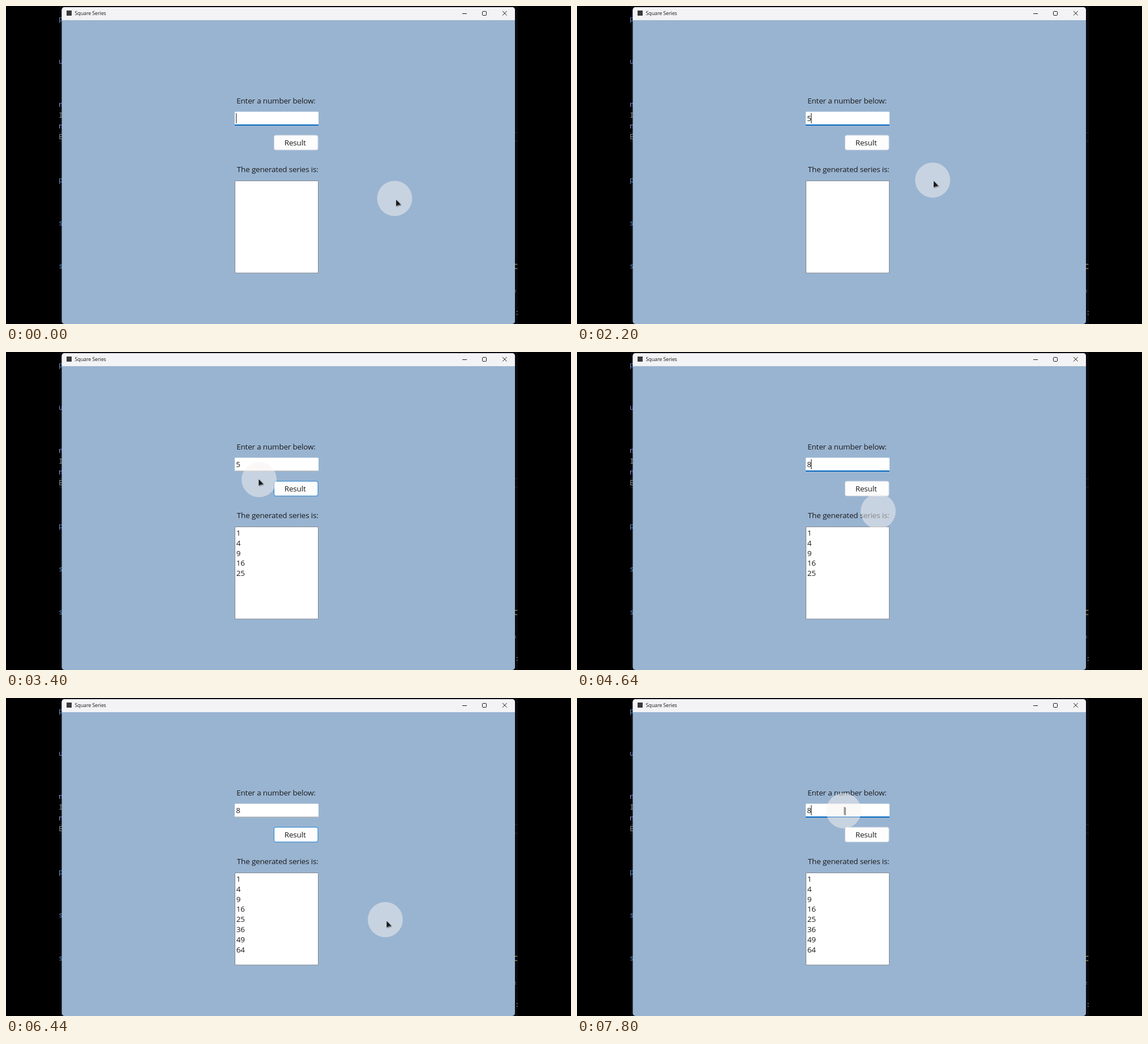
Write an HTML page with a canvas that moves like this. It is 998 by 561 pixels and loops after 8000 ms.

```html
<!DOCTYPE html>
<html lang="en">
<head>
<meta charset="utf-8">
<title>Square Series</title>
<style>
html, body { margin: 0; width: 100%; height: 100%; overflow: hidden; background: #000; }
canvas { display: block; width: 998px; height: 561px; }
</style>
</head>
<body>
<canvas id="stage" width="998" height="561"></canvas>
<script>
const ctx = document.getElementById('stage').getContext('2d');
const LOOP = 8000, STEP = 40;
const INK = '#1b1b1b', PANEL = '#99b4d1', BLUE = '#0067c0';
const SANS = '"Open Sans", "Noto Sans", sans-serif';
const MONO = '"Noto Sans Mono", "DejaVu Sans Mono", monospace';

// Pointer path: time, x, y
const path = [
  [1960, 686.5, 339.5], [2040, 690, 342], [2440, 514.5, 243], [2680, 514.5, 243],
  [2800, 615, 320], [3240, 615, 320], [3400, 447, 225], [3480, 436, 197],
  [3720, 436, 197], [3920, 532, 281], [5520, 532, 281], [5760, 514.5, 243],
  [6160, 514.5, 243], [6440, 670, 391], [7000, 670, 391], [7320, 474, 199],
  [7560, 474, 199], [7600, 471, 199]
];
const between = (t, a, b) => t >= a && t < b;
const ramp = (t, a, b) => Math.min(1, Math.max(0, (t - a) / (b - a)));

function pointerAt(t) {
  if (t <= path[0][0]) return path[0].slice(1);
  for (let i = 1; i < path.length; i++) {
    const [t0, x0, y0] = path[i - 1], [t1, x1, y1] = path[i];
    if (t <= t1) {
      const k = ramp(t, t0, t1), e = k * k * (3 - 2 * k);
      return [x0 + (x1 - x0) * e, y0 + (y1 - y0) * e];
    }
  }
  return path[path.length - 1].slice(1);
}

// 1 = text box has the focus line, 0 = plain border
function focusAt(t) {
  if (t < 3560) return 1 - ramp(t, 2640, 2760);
  if (t < 7560) return Math.min(ramp(t, 3520, 3640), 1 - ramp(t, 6000, 6240));
  return ramp(t, 7520, 7700);
}

function caretOn(t) {
  return t < 120 || between(t, 600, 1160) || between(t, 1360, 1680) ||
    between(t, 2200, 2600) || between(t, 3560, 5400) ||
    between(t, 5840, 6000) || t >= 7600;
}

function valueAt(t) {
  if (t < 1360) return '';
  if (t < 4360) return '5';
  return t < 4640 ? '' : '8';
}

function text(str, x, y, size = 13.5, gap = -0.19, color = INK) {
  ctx.font = `${size}px ${SANS}`;
  ctx.letterSpacing = gap + 'px';
  ctx.fillStyle = color;
  ctx.fillText(str, x, y);
}

function rect(x, y, w, h, color) {
  ctx.fillStyle = color;
  ctx.fillRect(x, y, w, h);
}

function box(x, y, w, h, r, fill, stroke) {
  ctx.beginPath();
  ctx.roundRect(x, y, w, h, r);
  if (fill) { ctx.fillStyle = fill; ctx.fill(); }
  if (stroke) { ctx.strokeStyle = stroke; ctx.lineWidth = 1; ctx.stroke(); }
}

function line(color, width, ...pts) {
  ctx.beginPath();
  for (let i = 0; i < pts.length; i += 2) {
    if (i % 4) ctx.lineTo(pts[i], pts[i + 1]);
    else ctx.moveTo(pts[i], pts[i + 1]);
  }
  ctx.strokeStyle = color;
  ctx.lineWidth = width;
  ctx.stroke();
}

// Slivers of the code editor that peek out beside the window
function drawEditor() {
  rect(0, 0, 998, 561, '#000');
  rect(95, 0, 809, 561, '#0a0a10');
  line('#26262b', 1, 94, 223.5, 904, 223.5, 94, 238.5, 904, 238.5);
  ctx.save();
  ctx.beginPath();
  ctx.rect(94, 0, 810, 561);
  ctx.clip();
  ctx.font = `13px ${MONO}`;
  ctx.letterSpacing = '0px';
  const glyphs = [
    ['p', 27, '#5d86bd'], ['u', 102, '#7a86c8'], ['n', 178, '#8f8fd0'],
    ['I', 197, '#8d8d8d'], ['n', 216, '#8f8fd0'], ['E', 235, '#8d8d8d'],
    ['p', 311, '#5d86bd'], ['s', 387, '#5d86bd'], ['s', 463, '#5d86bd']
  ];
  for (const [g, y, c] of glyphs) {
    ctx.fillStyle = c;
    ctx.fillText(g, 93, y);
  }
  ctx.fillStyle = '#b5a763';
  ctx.fillText('C', 896.5, 463.5);
  rect(898, 501, 3, 1, '#777');
  rect(898, 504, 3, 1, '#777');
  rect(902, 538, 1.5, 2, '#777');
  rect(902, 543, 1.5, 2, '#777');
  ctx.restore();
}

function drawWindow() {
  box(98.5, 2, 800.5, 559, 5, PANEL);
  box(98.5, 2, 800.5, 23, [5, 5, 0, 0], '#f3f3f5');
  rect(107, 8, 9, 9, '#3a3a3c');
  text('Square Series', 121.5, 16.3, 9, -0.15);
  line(INK, 1, 806, 13.5, 814, 13.5);
  box(841.5, 9.5, 7, 7, 1.2, null, INK);
  line(INK, 1, 877, 9, 884.6, 16.6, 884.6, 9, 877, 16.6);
  text('Enter a number below:', 407.2, 172);
  text('The generated series is:', 407.8, 293);
}

function drawInput(t) {
  const focus = focusAt(t), value = valueAt(t);
  box(404, 186.5, 148, 24, 1.5, '#fff');
  rect(404.5, 209.5, 147, 1, '#8c9096');
  ctx.globalAlpha = focus;
  rect(404, 209, 148, 2, BLUE);
  ctx.globalAlpha = 1;
  text(value, 406.2, 203);
  if (caretOn(t)) rect(value ? 413.4 : 406.3, 189, 1, 18, '#111');
}

function drawButton(t, x, y) {
  const hover = between(x, 474, 551) && between(y, 228, 254);
  const focused = between(t, 2600, 3600) || between(t, 5960, 7600);
  box(473.5, 228, 77.5, 26, 3, hover ? '#e8f2fa' : '#fdfdfd',
    hover || focused ? '#1f7ecb' : '#cdd5de');
  text('Result', 491.8, 246.3);
}

function drawList(t) {
  box(404.5, 308.5, 147, 162.5, 0, '#fff', '#828790');
  const count = t < 2600 ? 0 : t < 5960 ? 5 : 8;
  for (let i = 1; i <= count; i++) text(String(i * i), 406.7, 306 + 17.87 * i);
}

function drawPointer(t, x, y) {
  ctx.beginPath();
  ctx.arc(x, y, 31, 0, Math.PI * 2);
  ctx.fillStyle = 'rgba(247,243,241,0.5)';
  ctx.fill();
  if (between(t, 1360, 2000) || between(t, 4640, 5560)) return;

  if (between(x, 404, 552) && between(y, 187, 210)) {
    rect(x + 0.6, y - 7, 1, 14, '#555');
    rect(x + 2, y - 6, 2, 14, 'rgba(90,90,90,0.6)');
    return;
  }
  ctx.save();
  ctx.translate(x + (x - 490) / 75, y + Math.min(2.5, (y - 245) / 42));
  ctx.shadowColor = 'rgba(0,0,0,0.5)';
  ctx.shadowBlur = 2;
  ctx.shadowOffsetX = 1.5;
  ctx.shadowOffsetY = 1.5;
  ctx.beginPath();
  ctx.moveTo(0, 0);
  ctx.lineTo(0, 11.5);
  ctx.lineTo(3, 9);
  ctx.lineTo(8, 8.6);
  ctx.closePath();
  ctx.fillStyle = '#171717';
  ctx.fill();
  ctx.restore();
}

function draw(now) {
  const t = Math.floor((now % LOOP) / STEP) * STEP;
  const [x, y] = pointerAt(t);
  drawEditor();
  drawWindow();
  drawInput(t);
  drawButton(t, x, y);
  drawList(t);
  drawPointer(t, x, y);
}

const start = performance.now();
function tick() {
  draw(performance.now() - start);
  requestAnimationFrame(tick);
}
tick();
</script>
</body>
</html>
```
